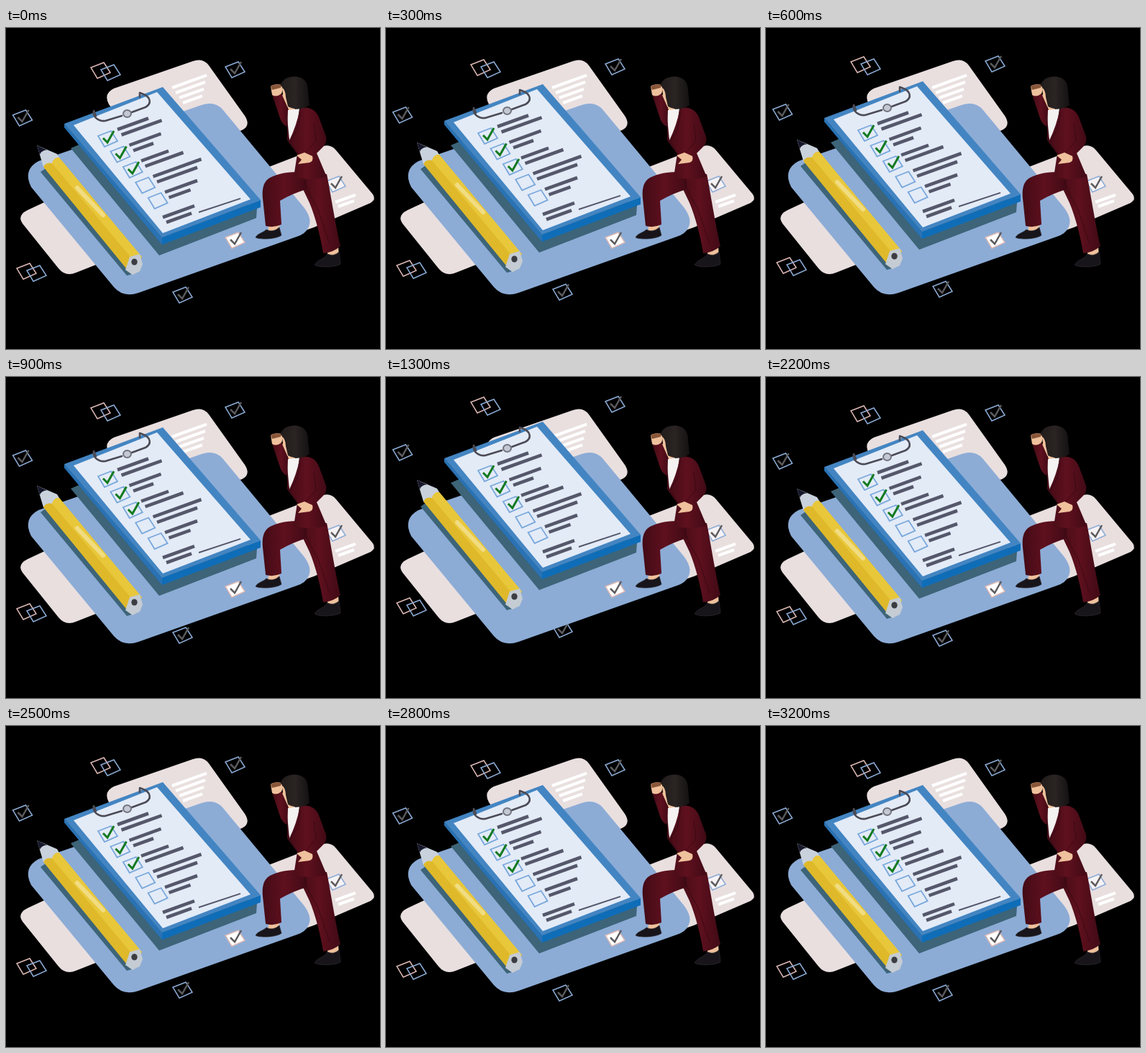
An HTML page that plays this animation: 520x446 px, repeating every 3300 ms.

```html
<!DOCTYPE html>
<html lang="en">
<head>
<meta charset="utf-8">
<title>Checklist</title>
<style>
  html, body { margin: 0; width: 100%; height: 100%; overflow: hidden; background: #000; }
  svg { display: block; width: 100%; height: 100%; }
  .pink { fill: #e9dfdf; }
  .shadow { fill: #3d6478; }
  .line { fill: none; stroke-linejoin: round; }
  .fold { stroke: #2c070e; stroke-width: 1; opacity: .6; }
  .skin { fill: #efc19c; }
  .shoe { fill: #17151a; stroke: #302c31; stroke-width: .7; }
</style>
</head>
<body>
<svg viewBox="0 0 520 446">
  <defs>
    <linearGradient id="suit" x1="0" x2="1">
      <stop offset="0" stop-color="#430b16"/><stop offset=".5" stop-color="#5f101e"/><stop offset="1" stop-color="#400a15"/>
    </linearGradient>
    <linearGradient id="hair" x1="0" x2="1">
      <stop offset="0" stop-color="#211b1b"/><stop offset=".5" stop-color="#2a2423"/><stop offset="1" stop-color="#141112"/>
    </linearGradient>
  </defs>

  <g class="float" id="loose"></g>

  <g class="pink">
    <path d="M150 84L260 46Q274 41 282 52L332 122Q341 136 328 142L230 176L190 170L143 106Q135 91 150 84Z"/>
    <path d="M350 199L438 165Q451 160 459 170L510 231Q515 238 507 243L428 277L405 285Z"/>
    <path d="M60 239L30 253Q14 261 24 273L73 334Q83 346 97 340L130 327Z"/>
  </g>
  <path fill="#8cacd6" d="M45 185L272 107Q290 101 301 113L414 249Q426 265 421 276Q417 286 404 290L184 368Q163 375 150 360L35 221Q23 197 45 185Z"/>
  <g id="notes"></g>

  <g class="float">
    <path class="shadow" d="M90 167L104 161L349 250L348 264L213 316Z"/>
    <path fill="#0f6db8" d="M81 133L217 291L354 239L354 249L217 301L81 138Z"/>
    <path fill="#2a72b3" d="M81 133L217 291V301L81 138Z"/>
    <path fill="#4385c2" d="M81 133L218 82L354 239L217 291Z"/>
    <path fill="#e3ebf7" d="M94 135L210 89L340 238L218 285Z"/>
    <g id="sheet"></g>
    <g class="line" stroke="#4b4b55" stroke-width="2.6" stroke-linecap="round">
      <path d="M122 115C120 124 129 130 138 129L161 122M175 117L194 110C203 105 201 96 191 92L186 90V96M122 115L125 122"/>
      <ellipse cx="168.500" cy="119" rx="5.500" ry="5" fill="#c3c9d4" stroke="#73747e" stroke-width="2"/>
    </g>

    <path class="shadow" d="M48 200L62 190L188 332L182 340L168 344Z"/>
    <path fill="#c9d2dc" d="M43 163L71 175L74 180L58 196L52 193Z"/>
    <path fill="#17172a" d="M43 163L57 169.500Q49 170 47 176Z"/>
    <path fill="#dfb92a" d="M52 193Q56 186 64 188Q67 179 74 180L189 319L167 334Z"/>
    <path fill="#e8c73a" d="M64 188Q67 179 74 180L189 318L178 324Z"/>
    <path class="line" d="M99 222L135 260" stroke="#f6e6a0" stroke-width="6" stroke-linecap="round" opacity=".7"/>
    <path fill="#c5ccd3" d="M166 336L172 318L186 314L190 328L186 338L176 343Z"/>
    <ellipse cx="178.500" cy="325" rx="4.200" ry="4.600" fill="#3b3d42"/>
  </g>

  <g>
    <path class="skin" d="M366 272H380V282H364ZM447 309L462 304L463 316L447 317Z"/>
    <path class="shoe" d="M362 280Q371 285 380 277L383 288C375 294 352 294 347 291C350 285 357 285 362 280Z"/>
    <path class="shoe" d="M447 314Q456 318 463 311L465 328C455 333 435 333 429 329C433 322 443 321 447 314Z"/>
    <g fill="url(#suit)">
      <path d="M406 200L446 203C451 228 457 268 465 303Q455 312 441 313C438 292 430 262 422 243L412 222Z"/>
      <path d="M404 200C388 200 372 204 364 210C357 216 356 226 357 237L361 275Q372 278 383 273L381 240Q398 230 418 224V203Z"/>
    </g>
    <path class="skin" d="M384 84L394 82L402 114L392 119V110Q387 112 384 107L385 101L382 98L385 92Z"/>
    <path fill="url(#suit)" d="M370 93Q376 95 383 91L394 116V137Q387 138 382 128Z"/>
    <path class="skin" d="M368 81Q373 77 383 79Q386 84 383 91Q376 97 370 93Z"/>
    <path fill="#8a563a" d="M368 81Q374 77 383 79L382 83L370 86Z"/>
    <path fill="#f5f2f2" d="M392 114L408 112L404 140L396 162L391 145Z"/>
    <path fill="url(#suit)" d="M409 111C424 109 431 115 435 124L445 151Q447 160 440 166L432 174L438 188L446 207Q422 213 400 207L405 175L391 156V125L394 156Q404 136 409 111Z"/>
    <path class="line fold" d="M410 116L405 141L395 158L408 178M428 132L431 157L417 173M415 212Q420 231 433 250L450 300"/>
    <path class="skin" d="M404 177L415 173L426 178Q428 185 422 187L406 189L411 183Z"/>
    <path fill="url(#hair)" d="M382 80C383 70 396 66 406 68C416 70 420 77 420 88L422 107C413 114 401 114 392 109L389 96Q389 86 382 80Z"/>
  </g>
</svg>
<script>
const svgNS = "http://www.w3.org/2000/svg";
const blue = "#8cacd6", rose = "#dcb8b4", ink = "#55576a";

function draw(parent, d, stroke, width, fill = "none") {
  const path = document.createElementNS(svgNS, "path");
  const attrs = { d, stroke, fill, "stroke-width": width };
  for (const key in attrs) path.setAttribute(key, attrs[key]);
  document.getElementById(parent).append(path);
}
const box = (parent, x, y, stroke, fill, width = 1.5) =>
  draw(parent, `M${x - 13} ${y - 4}l18 -7 9 14 -18 8Z`, stroke, width, fill);
const tick = (parent, x, y, stroke = "#5b5b5e", width = 2.5) =>
  draw(parent, `M${x - 6} ${y - 1}l6 6 9 -16`, stroke, width);
const bar = (parent, x, y, length, stroke, width, slope = 0.36) =>
  draw(parent, `M${x} ${y}l${length} ${-slope * length}`, stroke, width);

function checkbox(parent, x, y, stroke, fill) {
  box(parent, x, y, stroke, fill);
  tick(parent, x, y);
}
function squares(x, y) {
  box("loose", x, y, rose);
  box("loose", x + 14, y + 3, blue);
}

checkbox("loose", 318, 58, blue);
checkbox("loose", 22.5, 125, blue);
checkbox("loose", 245, 371, blue);
squares(131, 59);
squares(28, 338);
checkbox("notes", 318, 295, rose, "#fff");
checkbox("notes", 458, 217, blue, "#f6f2f4");
for (let i = 0; i < 4; i++) bar("notes", 231 + 5 * i, 83 + 7 * i, 48 - 7 * i, "#fff", 4);
for (let i = 0; i < 2; i++) bar("notes", 458 + 4 * i, 242 + 6 * i, 28 - 6 * i, "#fff", 4);

// Each row: a box, then two bars of the given lengths
[[43, 56], [44, 28], [38, 53], [67, 56], [45, 30]].forEach((lengths, i) => {
  const x = 141 + 17.4 * i, y = 154 + 21.5 * i;
  box("sheet", x, y, "#78a7db", "none", 1.8);
  if (i < 3) tick("sheet", x, y, "#137a20", 3);
  lengths.forEach((length, j) => bar("sheet", 155 + 16.5 * i + 5.5 * j, 141 + 21.8 * i + 7.5 * j, length, ink, 4.6));
});
bar("sheet", 218, 263, 44, ink, 4.6);
bar("sheet", 223, 270, 35, ink, 4.6);
bar("sheet", 268, 256, 58, ink, 2, 0.33);

// Five hard steps up, a short rest, five slower steps down
const loop = 3300, rise = 4;
const frames = [{ offset: 0, transform: "none", easing: "step-end" }];
for (let k = 1; k <= 10; k++) {
  const time = k <= 5 ? 200 + 275 * (k - 1) : 1500 + 290 * (k - 6);
  const y = -rise * Math.min(k, 10 - k);
  frames.push({ offset: time / loop, transform: `translateY(${y}px)`, easing: "step-end" });
}
frames.push({ offset: 1, transform: "none" });
document.querySelectorAll(".float").forEach(g => g.animate(frames, { duration: loop, iterations: Infinity }));
</script>
</body>
</html>
```
